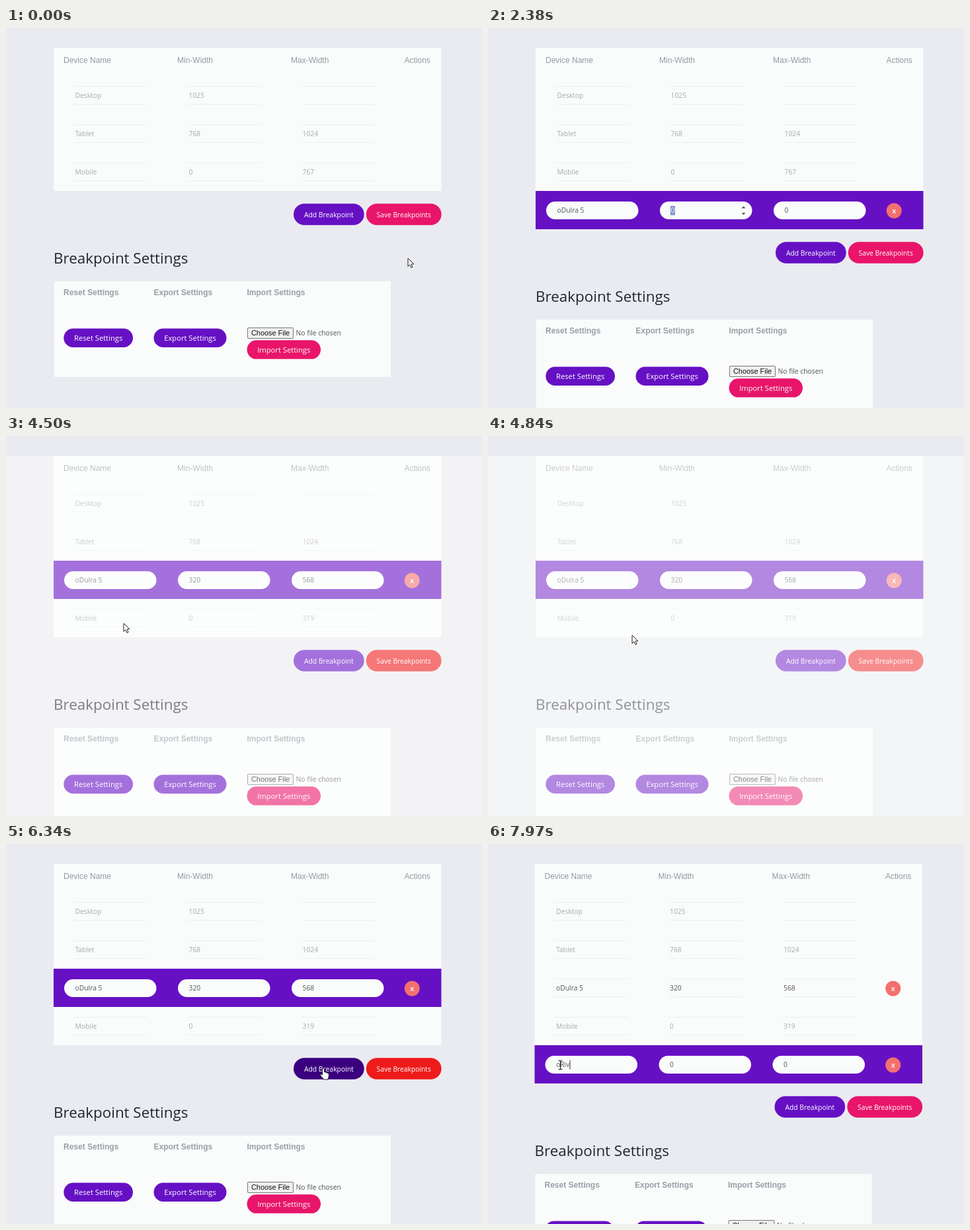
Write an HTML page with a canvas that moves like this. It is 720x576 px and loops after 8000 ms.

```html
<!DOCTYPE html>
<html lang="en">
<head>
<meta charset="utf-8">
<title>Breakpoint settings</title>
<style>
  html, body { margin: 0; width: 100%; height: 100%; overflow: hidden; background: #eaebf0; }
  canvas { display: block; }
</style>
</head>
<body>
<canvas id="stage" width="720" height="576"></canvas>
<script>
const ctx = document.getElementById('stage').getContext('2d');
const LOOP = 8000, ROW = 58, TOP = 30;
const SANS = '"Open Sans", "Noto Sans", sans-serif';
const ARIAL = '"Liberation Sans", sans-serif';
const PURPLE = '#6610c4', PINK = '#e8156a', RED = '#ee1b1b';
const COLUMNS = [88, 260, 432];

const ADD_1 = 360, FOCUS_NAME = 820, TAB_MIN = 2300, TAB_MAX = 3500;
const TAB_SAVE = 4300, SORTED = 4500, ADD_2 = 6430, FOCUS_NAME_2 = 7170;
const PHONE_KEYS = [1080, 1170, 1300, 1420, 1540, 1670, 1880, 2050];
const MIN_KEYS = [2670, 2900, 3150];
const MAX_KEYS = [3720, 3900, 4080];
const PAD_KEYS = [7510, 7640, 7790, 7920];

// time, x, y
const POINTER = [
  [0, 608, 349], [40, 608, 349], [300, 490, 286], [390, 490, 286],
  [810, 162.5, 277], [4320, 162.5, 277], [4840, 218, 302],
  [5460, 269, 292], [5910, 480, 340], [6490, 480, 340], [7120, 109.5, 335]
];

// time, white overlay opacity
const VEIL = [[4340, 0], [4540, .5], [5110, .5], [5300, 0]];

function tween(steps, t, ease = p => p) {
  if (t <= steps[0][0]) return steps[0].slice(1);
  for (let i = 1; i < steps.length; i++) {
    const [from, ...a] = steps[i - 1], [to, ...b] = steps[i];
    if (t < to) {
      const p = ease((t - from) / (to - from));
      return a.map((v, k) => v + (b[k] - v) * p);
    }
  }
  return steps[steps.length - 1].slice(1);
}
const smooth = p => p * p * (3 - 2 * p);

function text(str, x, y, font, color, align = 'left') {
  ctx.font = font;
  ctx.fillStyle = color;
  ctx.textAlign = align;
  ctx.fillText(str, x, y);
}
function box(x, y, w, h, color, radius = 0) {
  ctx.fillStyle = color;
  ctx.beginPath();
  ctx.roundRect(x, y, w, h, radius);
  ctx.fill();
}
function shape(points, fill, stroke) {
  ctx.beginPath();
  points.forEach(([x, y]) => ctx.lineTo(x, y));
  ctx.closePath();
  ctx.fillStyle = fill;
  ctx.fill();
  if (!stroke) return;
  ctx.strokeStyle = stroke;
  ctx.lineWidth = 1;
  ctx.stroke();
}
function button(b, color) {
  box(b.x, b.y, b.w, b.h, color, b.h / 2);
  text(b.label, b.x + b.w / 2, b.y + b.h / 2 + 4, `${b.size}px ${SANS}`, '#fff', 'center');
}
const inside = (x, y, b) => x >= b.x && x <= b.x + b.w && y >= b.y && y <= b.y + b.h;

function typed(word, keys, t, empty = '') {
  return word.slice(0, keys.filter(k => k <= t).length) || empty;
}

function focusAt(t) {
  if (t >= FOCUS_NAME_2) return { row: 4, col: 0, since: FOCUS_NAME_2, keys: PAD_KEYS };
  if (t >= TAB_SAVE || t < FOCUS_NAME) return null;
  if (t >= TAB_MAX) return { row: 3, col: 2, since: TAB_MAX, keys: MAX_KEYS };
  if (t >= TAB_MIN) return { row: 3, col: 1, since: TAB_MIN, keys: MIN_KEYS };
  return { row: 3, col: 0, since: FOCUS_NAME, keys: PHONE_KEYS };
}

function rowsAt(t) {
  const rows = [
    { cells: ['Desktop', '1025', ''] },
    { cells: ['Tablet', '768', '1024'] },
    { cells: ['Mobile', '0', t < SORTED ? '767' : '319'] }
  ];
  if (t >= ADD_1) {
    const phone = {
      editable: true, fresh: t < ADD_2,
      cells: [typed('oDulra 5', PHONE_KEYS, t), typed('320', MIN_KEYS, t, '0'), typed('568', MAX_KEYS, t, '0')]
    };
    rows.splice(t < SORTED ? 3 : 2, 0, phone);
  }
  if (t >= ADD_2) rows.push({ editable: true, fresh: true, cells: [typed('oRiv', PAD_KEYS, t), '0', '0'] });
  return rows;
}

function drawSpinner(x, y) {
  for (const dir of [-1, 1]) {
    const base = y + dir * 3.5;
    shape([[x - 3, base], [x + 3, base], [x, base + dir * 3]], '#505050');
  }
}

function drawFocus(focus, value, x, y, t) {
  ctx.font = `10.3px ${SANS}`;
  const width = ctx.measureText(value).width;
  const started = focus.keys[0] <= t;
  if (focus.col) drawSpinner(COLUMNS[focus.col] + 126.5, y);
  if (focus.col && !started) {
    box(x - .5, y - 7, width + 1, 14, '#7f92cf');
    text(value, x, y + 3.7, ctx.font, '#f2f4fb');
    return;
  }
  const last = Math.max(focus.since, ...focus.keys.filter(k => k <= t));
  if ((t - last) % 1060 < 530) box(Math.round(x + width), y - 7, 1, 14, '#333');
}

function drawRow(row, index, focus, t) {
  const y = 73 + index * ROW + TOP - 30, mid = y + 29.7;
  if (row.fresh) box(72, y + 16 - 16 + 0, 586.5, ROW, PURPLE);
  row.cells.forEach((value, col) => {
    const x = COLUMNS[col];
    if (row.fresh) {
      box(x, y + 16, 139.5, 27, '#fafcfc', 13.5);
    } else {
      box(x + 14, y + 15, 112, 1, '#edeff0');
      box(x + 14, y + 42, 112, 1, '#edeff0');
    }
    text(value, x + 16.5, mid + 3.7, `10.3px ${SANS}`, row.editable ? '#55585c' : '#a6abb0');
    if (focus && focus.row === index && focus.col === col) drawFocus(focus, value, x + 16.5, mid, t);
  });
  if (row.editable) {
    box(602.7, y + 18.5, 23, 23, '#f2706e', 11.5);
    text('x', 614.2, y + 34, `600 11px ${SANS}`, '#fff', 'center');
  }
}

function drawSettings(y) {
  text('Breakpoint Settings', 72, y + 110, `500 22.4px ${SANS}`, '#22262b');
  box(73, y + 137, 509, 145, '#fafbfb');
  [['Reset Settings', 87], ['Export Settings', 223.5], ['Import Settings', 364.5]]
    .forEach(([label, x]) => text(label, x, y + 158, `bold 12px ${ARIAL}`, '#999fa6'));

  const pill = (label, x, dy, w, color) =>
    button({ label, x, y: y + dy, w, h: 28.5, size: 11.2 }, color);
  pill('Reset Settings', 87.3, 208.5, 104.7, PURPLE);
  pill('Export Settings', 223.5, 208.5, 110, PURPLE);
  pill('Import Settings', 364.5, 226.3, 111.5, PINK);

  box(365, y + 207, 70, 17, '#777', 2);
  box(366, y + 208, 68, 15, '#efefef', 1);
  text('Choose File', 371, y + 219.3, `10.9px ${ARIAL}`, '#111');
  text('No file chosen', 438.5, y + 219, `10.3px ${SANS}`, '#50545a');
}

function drawPointer(kind, x, y) {
  ctx.save();
  ctx.translate(x, y);
  if (kind === 'text') {
    ctx.strokeStyle = '#222';
    ctx.lineWidth = 1.2;
    ctx.stroke(new Path2D('M-3-6.5H-1Q0-6.5 0-5.5Q0-6.5 1-6.5H3M0-5.5V5.5M-3 6.5H-1Q0 6.5 0 5.5Q0 6.5 1 6.5H3'));
  } else if (kind === 'hand') {
    const hand = new Path2D('M-1.5 1Q0-1 1.5 1V6L2.2 5Q4 5 4 7Q6 5.5 6.3 7.5Q8.3 6.5 8.3 9V12Q8 14 7 16V17H0V16L-4.5 10.5Q-4.5 8-1.5 10Z');
    ctx.fillStyle = '#fff';
    ctx.strokeStyle = '#222';
    ctx.lineWidth = 1;
    ctx.fill(hand);
    ctx.stroke(hand);
  } else {
    shape([[0, 0], [0, 12.5], [2.8, 9.8], [5, 14.3], [7, 13.3], [5, 9], [8.8, 8.8]], '#fff', '#222');
  }
  ctx.restore();
}

function draw(t) {
  const rows = rowsAt(t), focus = focusAt(t);
  const bottom = 73 + rows.length * ROW;
  const shift = t >= ADD_2 ? -1.5 : 0;
  const [px, py] = tween(POINTER, t, smooth);
  const hx = px - shift;

  const add = { label: 'Add Breakpoint', x: 435, y: bottom + 19.3, w: 106.7, h: 32.5, size: 10.35 };
  const save = { label: 'Save Breakpoints', x: 544.8, y: bottom + 19.3, w: 113.8, h: 32.5, size: 10.25 };
  const overAdd = inside(hx, py, add), overSave = inside(hx, py, save);
  const saveFocused = t >= TAB_SAVE && t < ADD_2;

  box(0, 0, 720, 576, '#eaebf0');
  ctx.save();
  ctx.translate(shift, 0);
  box(72, TOP, 586.5, bottom - TOP, '#fafbfb');
  [['Device Name', 87], ['Min-Width', 259], ['Max-Width', 431], ['Actions', 602.5]]
    .forEach(([label, x]) => text(label, x, 53.3, `12px ${ARIAL}`, '#949aa1'));
  rows.forEach((row, i) => drawRow(row, i, focus, t));
  button(add, overAdd ? '#3b0080' : PURPLE);
  button(save, overSave || saveFocused ? RED : PINK);
  drawSettings(bottom);
  ctx.restore();

  const [veil] = tween(VEIL, t);
  if (veil) box(0, TOP, 720, 576 - TOP, `rgba(255,255,255,${veil})`);

  if (t >= TAB_MIN && t < 4330) return;
  const overField = rows.some((row, i) => row.editable && COLUMNS.some(x =>
    inside(hx, py, { x, y: 89 + i * ROW, w: 139.5, h: 27 })));
  drawPointer(overAdd || overSave ? 'hand' : overField ? 'text' : 'arrow', px, py);
}

const start = performance.now();
function frame() {
  draw((performance.now() - start) % LOOP);
  requestAnimationFrame(frame);
}
frame();
</script>
</body>
</html>
```
